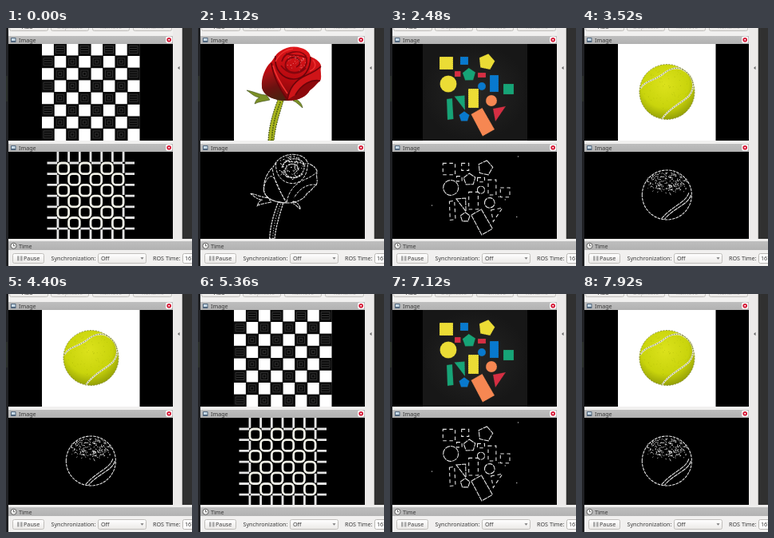
An HTML page for the animation above (8 s loop, 233 by 298 pixels).

```html
<!DOCTYPE html>
<html lang="en">
<head>
<meta charset="utf-8">
<title>Image viewer</title>
<style>
html, body { margin: 0; width: 100%; height: 100%; overflow: hidden; background: #f1f0ef; }
svg { display: block; width: 233px; height: 298px; }
text { font: 7.2px "Noto Sans", "Open Sans", sans-serif; fill: #3a3a3a; }
.off { fill: #b9b7b5; }
.line { fill: none; stroke: #e4e4e4; stroke-linecap: butt; }
</style>
</head>
<body>
<svg id="stage" viewBox="0 0 233 298">
  <defs>
    <linearGradient id="bar" x2="0" y2="1"><stop stop-color="#bebebe"/><stop offset="1" stop-color="#b2b2b2"/></linearGradient>
    <linearGradient id="btn" x2="0" y2="1"><stop stop-color="#fff"/><stop offset="1" stop-color="#ebe9e7"/></linearGradient>
    <radialGradient id="felt" cx=".46" cy=".36" r=".66">
      <stop stop-color="#dce21c"/><stop offset=".65" stop-color="#c9d40c"/><stop offset="1" stop-color="#8f9b06"/>
    </radialGradient>
    <linearGradient id="petal" x1=".65" x2=".35" y2="1">
      <stop stop-color="#e0161a"/><stop offset=".6" stop-color="#b80a10"/><stop offset="1" stop-color="#700a0a"/>
    </linearGradient>
    <linearGradient id="shade" x1=".3" x2=".6" y2="1">
      <stop stop-color="#b01216"/><stop offset=".55" stop-color="#6b1210"/><stop offset="1" stop-color="#4a2410"/>
    </linearGradient>
    <radialGradient id="table"><stop stop-color="#262625"/><stop offset="1" stop-color="#171717"/></radialGradient>
    <clipPath id="topClip"><rect x="3" y="20" width="206" height="121"/></clipPath>
    <clipPath id="lowClip"><rect x="3" y="155" width="206" height="109"/></clipPath>
  </defs>
  <rect width="233" height="298" fill="#f1f0ef"/>
  <g id="chrome"></g>
  <rect x="3" y="20" width="206" height="121"/>
  <rect x="3" y="155" width="206" height="109"/>
  <g id="photos" clip-path="url(#topClip)"></g>
  <g id="edges" clip-path="url(#lowClip)"></g>
</svg>
<script>
const SCENE_MS = 1120, LOOP_MS = 8000;
const byId = id => document.getElementById(id);

let seed = 7;
const rand = () => (seed = (seed * 16807) % 2147483647) / 2147483647;

const rect = (x, y, w, h, fill, more = '') =>
  `<rect x="${x}" y="${y}" width="${w}" height="${h}" fill="${fill}" ${more}/>`;
const path = (d, more) => `<path d="${d}" ${more}/>`;
const label = (x, y, s, more = '') => `<text x="${x}" y="${y}" ${more}>${s}</text>`;
const stroke = (d, w, dash = '') => path(d, `class="line" stroke-width="${w}" stroke-dasharray="${dash}"`);
const button = (x, y, w, h) => rect(x + .5, y + .5, w - 1, h - 1, 'url(#btn)', 'rx="2" stroke="#c0bebb"');
const circle = (x, y, r) => `M${x - r} ${y}a${r} ${r} 0 1 1 ${2 * r} 0a${r} ${r} 0 1 1 ${-2 * r} 0z`;
const box = (x, y, w, h) => `M${x} ${y}h${w}v${h}h${-w}z`;
const paper = () => rect(45, 20, 122.5, 122, '#fff');

function pentagon(x, y, r, turn) {
  const pts = [0, 1, 2, 3, 4].map(i => {
    const a = (turn + i * 72) * Math.PI / 180;
    return `${(x + r * Math.cos(a)).toFixed(1)} ${(y + r * Math.sin(a)).toFixed(1)}`;
  });
  return `M${pts.join('L')}z`;
}

// Short random strokes inside an ellipse
function flecks(n, cx, cy, rx, ry, size) {
  let d = '';
  for (let i = 0; i < n; i++) {
    const a = rand() * 6.283, r = Math.sqrt(rand());
    const x = cx + rx * r * Math.cos(a), y = cy + ry * r * Math.sin(a);
    d += `M${x.toFixed(1)} ${y.toFixed(1)}l${((rand() - .3) * size).toFixed(1)} ${((rand() - .5) * size).toFixed(1)}`;
  }
  return d;
}

function titleBar(y, name) {
  return rect(3, y, 206, 10, 'url(#bar)') +
    rect(6, y + 2, 6.5, 6, '#51667c', 'rx=".8"') + rect(7, y + 3, 4.5, 3, '#c5d8e6') +
    label(16, y + 7.8, name) +
    rect(200.2, y + .8, 8, 8, '#fff', 'rx="2"') +
    `<circle cx="204.2" cy="${y + 4.8}" r="1.9" fill="#fff" stroke="#d41432" stroke-width="1.8"/>`;
}

function chrome() {
  const top = [[4, 49, 'Add', 20], [56, 48, 'Duplicate', 64], [108, 47, 'Remove', 118], [159, 49, 'Rename', 170]];
  return rect(0, 0, 3, 298, '#202124') + rect(0, 60, 2, 32, '#2b302a') +
    top.map(([x, w, s, tx], i) => button(x, -10, w, 14) + label(tx, 1.3, s, i ? 'class="off"' : '')).join('') +
    titleBar(10, 'Image') + titleBar(145, 'Image') +
    rect(209, 0, 12, 265, '#eceae9') + rect(221, 0, 12, 264, '#303030') + rect(220, 0, 1, 264, '#bdbbb9') +
    path('M217.5 47.8v4.4l-2.5-2.2z', 'fill="#666"') +
    rect(3, 264, 230, 3, '#efeeed') + rect(3, 267, 230, 11, 'url(#bar)') +
    '<circle cx="9.5" cy="272.7" r="3.6" fill="#f4f4f2" stroke="#555" stroke-width=".9"/>' +
    path('M9.5 270.3v2.5h1.8', 'fill="none" stroke="#444" stroke-width=".8"') +
    label(16, 275.5, 'Time') +
    button(8, 282, 40, 13) + rect(14, 285.5, 2.6, 6, '#aaa') + rect(18, 285.5, 2.6, 6, '#aaa') +
    label(22, 291.2, 'Pause') + label(56.5, 291.2, 'Synchronization:') +
    button(115, 282, 61, 13) + label(119, 291.2, 'Off') + path('M168.5 287.3h4l-2 2.4z', 'fill="#777"') +
    label(184, 291.2, 'ROS Time:') +
    rect(221.5, 282.5, 30, 12, '#fff', 'rx="2" stroke="#b8b6b3"') + label(224, 291.2, '167');
}

function chess() {
  const w = 15.3, h = 15.2;
  let photo = paper(), marks = '';
  for (let r = 0; r < 8; r++) for (let c = 0; c < 8; c++) {
    if ((r + c) % 2 === 0) continue;
    const x = 45 + c * w, y = 19.5 + r * h;
    photo += rect(x - .4, y - .3, w + .8, h + .6, '#0b0b0b');
    const inner = c > 0 && c < 7 && r > 0;
    marks += inner
      ? box(x + 3, y + 3, 9, 9) + box(x + 5.5, y + 5.5, 4, 4)
      : box(x + 2, y + 3, 11, 9) + `M${x + 3} ${y + 6}h9m-9 3h9`;
  }
  photo += path(marks, 'fill="none" stroke="#3b3b3b" stroke-width=".8"');

  const u = 13.7, X = i => 51.2 + u * i, Y = i => 155.3 + u * i;
  let ends = '', cells = '';
  for (let i = 1; i < 8; i++)
    ends += `M${X(i)} 155v${u - 1}M${X(i)} 264v${2 - u}M51.5 ${Y(i)}h${u - 1}M161 ${Y(i)}h${2 - u}`;
  for (let r = 1; r < 7; r++) for (let c = 1; c < 7; c++)
    if ((r + c) % 2 === 0)
      cells += rect(X(c), Y(r), u, u, 'none', 'rx="4.5" stroke="#f0f0e6" stroke-width="2.8"');
  for (let i = 1; i < 7; i++) {
    const side = i % 2 ? 7 : 1;
    ends += `M${X(side)} ${Y(i) + 1}v${u - 2}M${X(i) + 1} ${Y(side)}h${u - 2}`;
  }
  return [photo, stroke(ends, 2.8) + cells];
}

function rose() {
  const head = 'M80 74C79 62 84 50 91 43C95 40 96 33 103 29C110 24 120 22 129 25C136 27 140 31 141 36C148 38 155 44 154 49C152 54 156 60 153 66C148 70 146 74 140 78C136 86 124 92 110 91C94 90 82 85 80 74z';
  const left = 'M80 74C80 64 84 56 90 54C97 55 99 70 111 91C95 91 82 85 80 74z';
  const folds = 'M92 44C94 60 102 76 112 90M112 90C114 76 122 65 136 59C143 56 149 53 154 48M97 35C95 52 106 64 120 64C133 64 141 52 141 36M153 66C142 64 130 70 122 84';
  const swirl = 'M105 42C108 29 128 26 135 35C140 47 129 58 116 55C106 51 108 39 118 37C128 36 131 45 123 49M110 32C118 36 128 32 137 38M104 47C112 58 125 60 135 50';
  const leaves = 'M86 84C78 84 72 80 61 78C67 82 70 86 77 87C73 89 72 92 71 95C76 92 82 92 90 90zM121 89C126 90 130 94 131 100C127 97 124 93 119 91z';
  const stem = 'M88 141C89 122 94 106 100 90L107 91C102 108 97 122 95 141z';
  const vein = 'M92.5 141C93 122 98 106 103.5 92';
  const photo = paper() +
    path(stem, 'fill="#a9b51d" stroke="#39480e" stroke-width="1" stroke-dasharray="2 1"') +
    path(vein, 'fill="none" stroke="#4f6212" stroke-width="1.6" stroke-dasharray="2 1"') +
    path(leaves, 'fill="#7c9026" stroke="#3a4a18" stroke-width=".6"') +
    path(head, 'fill="url(#petal)"') +
    path(left, 'fill="url(#shade)"') +
    path('M112 90C114 76 122 65 136 59C143 56 149 53 154 48C152 54 156 60 153 66C142 64 130 70 122 84z', 'fill="#cf1418"') +
    path('M122 84C130 70 142 64 153 66C148 70 146 74 140 78C136 86 124 92 112 90z', 'fill="#8c080c"') +
    path(folds, 'fill="none" stroke="#6c040a" stroke-width="1.7"') +
    path(swirl, 'fill="none" stroke="#85060d" stroke-width="1.8"') +
    path('M97 42C102 32 111 27 119 26M144 40C149 46 147 51 140 54M94 47C97 59 105 72 112 82', 'fill="none" stroke="#ee3030" stroke-width="1.6"') +
    path(flecks(40, 122, 44, 13, 10, 2.2), 'stroke="#f7a8a5" stroke-width=".7"');
  const edge = stroke(head + leaves, 1.2, '5 1 3 1') + stroke(left + folds, 1.1, '4 1.4') +
    stroke(swirl, 1.2, '3 1') + stroke(stem, 1.4, '3 1') + stroke(vein, 1, '1.5 2') +
    stroke(flecks(90, 119, 43, 20, 17, 3.8), 1.1);
  return [photo, shrink(edge)];
}

function shapes() {
  const Y = '#ebdc35', B = '#0879ce', G = '#16a477', R = '#d62e43', O = '#f68752';
  const list = [
    [Y, box(62, 36, 17, 16)], [B, box(88, 36, 10, 10)], [Y, pentagon(121, 42.5, 10.5, -78)],
    [R, box(81, 54, 7.5, 7)], [G, pentagon(99, 58.5, 8.5, -92)], [R, box(110, 56, 10, 6)],
    [B, box(125, 59, 11, 21)], [Y, circle(73, 70, 10.5)], [B, circle(115, 73, 5)],
    [G, box(142, 70, 13, 13)], [Y, box(98, 76, 13, 24)], [O, circle(127, 91, 7)],
    [G, 'M71 89L78 88L79.5 114L72 115z'], [G, 'M80.5 85.5L93.5 84.5L94 103z'],
    [R, 'M129 101L145 98L132 117z'], [B, pentagon(93, 111, 6.8, -90)],
    [O, 'M101.5 108L115.5 100L131 127L116 135.5z']
  ];
  const photo = rect(41, 20, 131, 122, 'url(#table)') +
    list.map(([c, d]) => path(d, `fill="${c}" stroke="#39382b" stroke-width=".5" stroke-dasharray="1 1.5"`)).join('');
  const solid = [2, 4, 7, 8, 11, 13, 15, 16];
  const edge = list.map(([, d], i) => stroke(d, 1.2, solid.includes(i) ? '7 1' : '5 4')).join('') +
    [[166, 26], [164, 110], [46, 94], [139, 82], [148, 86]].map(([x, y]) => rect(x, y, 1.4, 1.2, '#ccc')).join('');
  return [photo, shrink(edge)];
}

function ball() {
  const rim = circle(106.5, 80, 34.5);
  const upper = 'M73 76C79 66 90 66 101 58C109 51 119 48 126 52';
  const lower = 'M126 52C140 59 143 74 134 85C124 95 110 99 100 114';
  const seam = upper + lower;
  const photo = paper() + path(rim, 'fill="url(#felt)"') +
    path(flecks(110, 106, 76, 32, 30, 1.5), 'stroke="#a8b409" stroke-width=".6"') +
    path(seam, 'fill="none" stroke="#eef0d2" stroke-width="2"') +
    path(seam, 'fill="none" stroke="#66673f" stroke-width=".9" stroke-dasharray="1.5 1.5"') +
    path(rim, 'fill="none" stroke="#747b18" stroke-width=".8" stroke-dasharray="2 1.5"');
  const edge = stroke(rim, 1.2, '4 1.2') +
    stroke(flecks(175, 106, 61, 28, 13, 3.4), 1.05) +
    stroke(flecks(35, 105, 71, 31, 8, 2.8), 1) +
    stroke('M137 77C133 91 114 95 99 113M140 80C136 94 116 98 103 114', 1.2, '6 .8');
  return [photo, shrink(edge)];
}

// The lower view shows the same picture at nine tenths size
function shrink(art) {
  return `<g transform="translate(10.5 137) scale(.9)">${art}</g>`;
}

byId('chrome').innerHTML = chrome();
const scenes = [chess(), rose(), shapes(), ball()];
['photos', 'edges'].forEach((id, k) => {
  byId(id).innerHTML = scenes.map(s => `<g>${s[k]}</g>`).join('');
});

function show(t) {
  const now = Math.floor((t % LOOP_MS) / SCENE_MS) % scenes.length;
  for (const id of ['photos', 'edges'])
    [...byId(id).children].forEach((g, i) => { g.style.display = i === now ? '' : 'none'; });
}

const start = performance.now();
function tick() {
  show(performance.now() - start);
  requestAnimationFrame(tick);
}
show(0);
requestAnimationFrame(tick);
</script>
</body>
</html>
```
